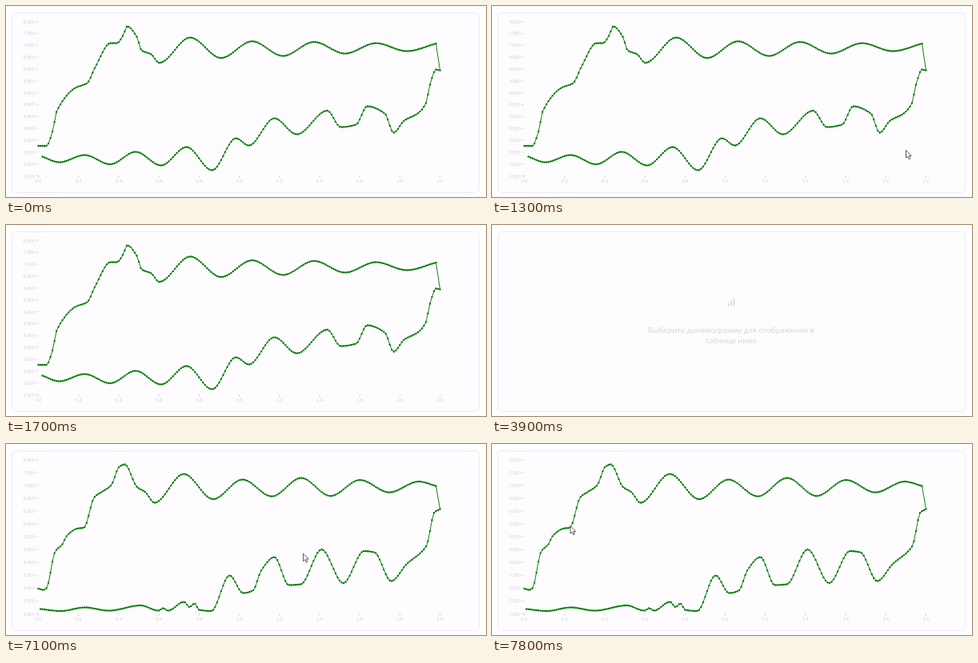
An HTML page with a canvas that plays this animation: 600x239 px, repeating every 8000 ms.

```html
<!DOCTYPE html>
<html lang="ru">
<head>
<meta charset="utf-8">
<title>Динамограмма</title>
<style>
html, body { margin: 0; width: 100%; height: 100%; overflow: hidden; background: #fefefe; }
canvas { display: block; }
</style>
</head>
<body>
<canvas id="stage" width="600" height="239"></canvas>
<script>
const ctx = document.getElementById('stage').getContext('2d');
const LOOP = 8000, LEFT = 40, RIGHT = 542, TOP = 19, BOTTOM = 212;
const SAMPLE = (RIGHT - LEFT) / 200;

// Evenly spaced crests and troughs of an oscillation.
const swings = (start, halfPeriod, levels) => levels.map((y, i) => [start + i * halfPeriod, y]);

// Each branch is a few turning points, joined by a smooth curve.
const first = makeChart(1500,
  [[40, 174.5], [50, 174.5], [58, 155], [63, 131], [86, 102], [101, 96], [111, 76], [130, 46],
    [138, 46], [146, 36], [151, 25], [163, 38], [169, 55], [181, 60],
    ...swings(191, 38.7, [70.5, 39, 64.5, 43.7, 62, 44.5, 59, 46, 56]), [537, 46.5]],
  [[45, 188], ...swings(66, 31.85, [195, 186, 197.5, 182, 199, 176, 205]),
    [287, 165], [303, 174], [335, 140], [363, 160], [401, 130.5], [418, 151], [437, 148],
    [451, 125], [473, 134], [484, 158], [497, 143], [514, 134], [524, 122], [530, 96],
    [537, 79], [542, 80]]);

const second = makeChart(2000,
  [[40, 180.5], [46, 182], [50, 180], [61, 134], [70, 125], [75, 115], [88, 105.5], [97, 104],
    [110, 66], [120, 59], [131, 51], [141, 28], [148, 25], [163, 53], [174, 60],
    ...swings(185, 36.7, [73, 37, 68.5, 44, 65, 42, 64.5, 44.5, 60, 46.5]), [537, 52]],
  [[43, 206], [68, 208.5], [98, 204], [128, 208], [168, 201.5], [190, 208], [196, 205],
    [202, 208], [222, 197], [229, 203.5], [235, 199], [241, 207], [256, 208.5], [279, 164],
    [296, 186], [308, 183], [319, 157], [335, 141], [353, 176], [368, 175], [394, 131.5],
    [421, 173.5], [447, 133.5], [460, 135], [481, 171], [500, 150], [525, 127], [535, 85],
    [542, 81]]);

// Pointer stops as [time, x, y].
const pointerDown = [[800, 497, 0], [1100, 530, 125], [1300, 517, 180], [1600, 272, 227]];
const pointerUp = [[6900, 512, 227], [7300, 230, 46], [7500, 149, 118], [7700, 104, 102],
  [7800, 97.5, 102], [7900, 97.5, 102]];
const arrow = new Path2D('M0 0V9.6L2.2 7.6L3.8 11.2L5.4 10.5L3.8 7H6.7Z');

// Monotone cubic interpolation, read at every sample position.
function samplePoints(knots) {
  const last = knots.length - 1;
  const slope = i => (knots[i + 1][1] - knots[i][1]) / (knots[i + 1][0] - knots[i][0]);
  const tangent = i => {
    if (i === 0) return slope(0);
    if (i === last) return slope(last - 1);
    const a = slope(i - 1), b = slope(i);
    return a * b <= 0 ? 0 : 2 * a * b / (a + b);
  };
  const index = x => Math.round((x - LEFT) / SAMPLE);
  const points = [];
  let k = 0;
  for (let i = index(knots[0][0]); i <= index(knots[last][0]); i++) {
    const x = LEFT + i * SAMPLE;
    while (k < last - 1 && x > knots[k + 1][0]) k++;
    const [x0, y0] = knots[k], [x1, y1] = knots[k + 1];
    const h = x1 - x0, u = Math.min(1, Math.max(0, (x - x0) / h)), v = 1 - u;
    points.push([x, v * v * (1 + 2 * u) * y0 + u * u * (1 + 2 * v) * y1
      + h * u * v * (v * tangent(k) - u * tangent(k + 1))]);
  }
  return points;
}

function makeChart(minimum, upper, lower) {
  return { minimum, points: [...samplePoints(upper), ...samplePoints(lower).reverse()] };
}

function drawText(text, x, y, font, color, align) {
  ctx.font = font;
  ctx.fillStyle = color;
  ctx.textAlign = align;
  ctx.fillText(text, x, y);
}

function drawCard() {
  ctx.fillStyle = '#fefefe';
  ctx.fillRect(-1, -1, 602, 241);
  ctx.beginPath();
  ctx.roundRect(7, 8, 584, 225, 5);
  ctx.fillStyle = '#fefcff';
  ctx.fill();
  ctx.strokeStyle = '#efeaf4';
  ctx.lineWidth = 1;
  ctx.stroke();
}

function drawAxes(minimum) {
  const font = '5.6px "Liberation Sans", Arial, sans-serif', color = '#cfcfd4';
  const count = (8000 - minimum) / 500;
  for (let i = 0; i <= count; i++) {
    const y = TOP + (BOTTOM - TOP) * i / count;
    drawText((8000 - i * 500).toLocaleString('en-US'), 35, y + 2, font, color, 'right');
    ctx.fillRect(36.5, y - 0.4, 3, 0.8);
  }
  for (let i = 0; i <= 10; i++) {
    const x = LEFT + (RIGHT - LEFT) * i / 10;
    drawText((i / 5).toFixed(1), x, 220.7, font, color, 'center');
    ctx.fillRect(x - 0.4, BOTTOM - 0.5, 0.8, 3);
  }
}

function drawChart({ minimum, points }) {
  drawAxes(minimum);
  ctx.beginPath();
  for (const [x, y] of points) ctx.lineTo(x, y);
  ctx.strokeStyle = '#108410';
  ctx.lineWidth = 1;
  ctx.stroke();
  ctx.beginPath();
  for (const [x, y] of points) {
    ctx.moveTo(x + 1.2, y);
    ctx.arc(x, y, 1.2, 0, 2 * Math.PI);
  }
  ctx.fillStyle = '#007a00';
  ctx.fill();
}

function drawPlaceholder() {
  ctx.fillStyle = '#c6c6ca';
  for (let i = 0; i < 3; i++) ctx.fillRect(294.5 + i * 3.4, 97.5 - i * 3, 1.1, 3 + i * 3);
  const font = '9.45px "Open Sans", sans-serif', color = '#d3d3d7';
  drawText('Выберите динамограмму для отображения в', 298.5, 134, font, color, 'center');
  drawText('таблице ниже', 298.5, 147.1, font, color, 'center');
}

// The pointer jumps once every 100 ms.
function drawPointer(stops, time) {
  const now = Math.floor(time / 100) * 100;
  const k = stops.findLastIndex(([start]) => start <= now);
  const [t0, x0, y0] = stops[k] ?? [];
  if (k < 0 || (k === stops.length - 1 && now > t0)) return;
  const [t1, x1, y1] = stops[k + 1] ?? [t0 + 100, x0, y0];
  const u = (now - t0) / (t1 - t0);
  ctx.save();
  ctx.translate(x0 + (x1 - x0) * u, y0 + (y1 - y0) * u);
  ctx.fillStyle = '#fff';
  ctx.fill(arrow);
  ctx.strokeStyle = '#4a4a4a';
  ctx.lineWidth = 0.9;
  ctx.stroke(arrow);
  ctx.restore();
}

function frame() {
  const time = performance.now() % LOOP;
  drawCard();
  if (time < 3900) drawChart(first);
  else if (time < 6300) drawPlaceholder();
  else drawChart(second);
  drawPointer(pointerDown, time);
  drawPointer(pointerUp, time);
  requestAnimationFrame(frame);
}

ctx.translate(0.5, 0.5); // whole coordinates fall on pixel centres
frame();
</script>
</body>
</html>
```
